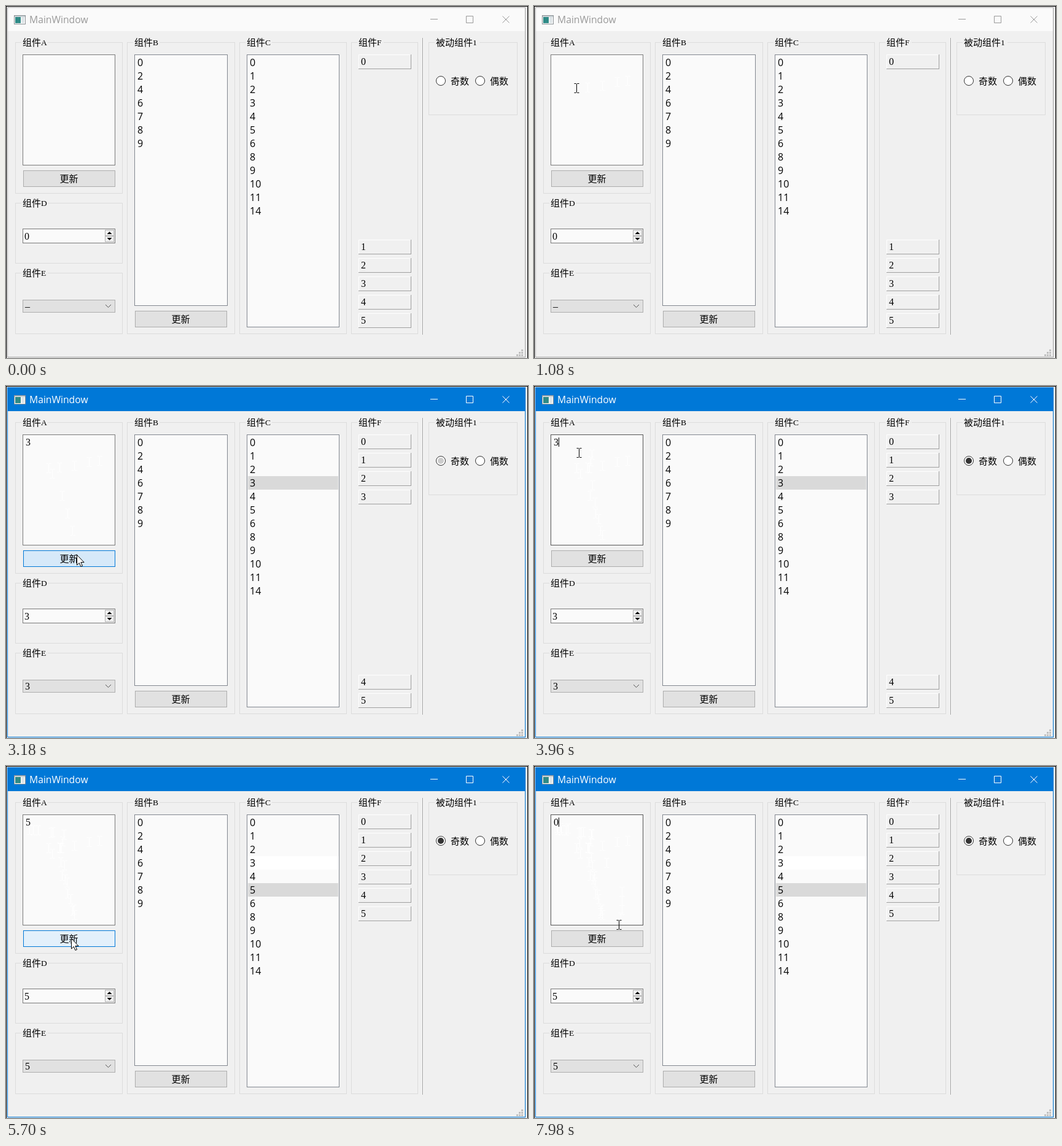
An HTML page for the animation above (8000 ms loop, 850 px wide and 574 px high).

```html
<!DOCTYPE html>
<html lang="zh-CN">
<head>
<meta charset="utf-8">
<title>MainWindow</title>
<style>
html, body { margin: 0; width: 100%; height: 100%; overflow: hidden; background: #f0f0f0; }
svg { display: block; width: 850px; height: 574px; }
text { white-space: pre; fill: #000; }
.cjk { font: 15px "Noto Sans CJK SC", "Noto Sans CJK", sans-serif; }
.lat { font: 13.5px "Liberation Serif", serif; }
.num { font: 16px "Liberation Serif", serif; }
.row { font: 16px "Open Sans", "Noto Sans", sans-serif; }
#title { font: 15.7px "Open Sans", "Noto Sans", sans-serif; }
rect { shape-rendering: crispEdges; }
</style>
</head>
<body>
<svg id="stage" viewBox="0 0 850 574" xmlns="http://www.w3.org/2000/svg"></svg>
<script>
const LOOP = 8000, STEP = 60;
const FACE = '#f0f0f0', PAPER = '#fafafa', BLUE = '#0078d7';
const ACTIVATE = 1140, FIRST = 3120, SECOND = 5520;

// ---- markup helpers ----
const fill = (x, y, w, h, c, id = '') =>
  `<rect ${id && `id="${id}"`} x="${x}" y="${y}" width="${w}" height="${h}" fill="${c}"/>`;
const box = (x, y, w, h, c, line, id = '') =>
  `<rect ${id && `id="${id}"`} x="${x + .5}" y="${y + .5}" width="${w - 1}" height="${h - 1}" fill="${c}" stroke="${line}"/>`;
const text = (x, y, cls, s, id = '') => `<text ${id && `id="${id}"`} class="${cls}" x="${x}" y="${y}">${s}</text>`;
const path = (d, attrs) => `<path d="${d}" ${attrs}/>`;

function group(x, y, w, h, name, mark) {
  const tw = name.length * 15 + 8;
  return box(x, y, w, h, 'none', '#dcdcdc') + fill(x + 10, y, tw + 5, 1, FACE) +
    text(x + 12, y + 6, 'cjk', `${name}<tspan class="lat" dy="-1">${mark}</tspan>`);
}

function button(x, y, id) {
  return box(x, y, 150, 27, '#e1e1e1', '#adadad', id) + text(x + 59.5, y + 19, 'cjk', '更新');
}

const rows = (x, list) => list.map((n, i) => text(x, 98 + 22 * i, 'row', n)).join('');

function radio(x, label) {
  return `<circle cx="${x}" cy="122" r="7.5" fill="#fff" stroke="#333"/>` + text(x + 16, 128, 'cjk', label);
}

function plate(n) {
  return `<g id="plate${n}">` + fill(574, 0, 86, 24, '#a0a0a0') + fill(574, 0, 85, 23, '#fff') +
    fill(575, 1, 84, 22, FACE) + text(578, 17, 'num', n) + '</g>';
}

function grip() {
  let s = '';
  for (let r = 0; r < 3; r++)
    for (let c = 2 - r; c < 3; c++) s += fill(831 + 4 * c, 560 + 4 * r, 3, 3, '#bfbfbf');
  return s;
}

const icon = box(13, 15, 19, 15, '#fff', '#8a9094') + fill(14, 16, 17, 2, '#c9d2d6') +
  fill(15, 18, 9, 10, '#2f8a86') + fill(25, 18, 5, 10, '#dfe5e8');

const stage = document.getElementById('stage');
stage.innerHTML =
  fill(0, 0, 850, 574, '#000') + fill(1, 1, 848, 573, '#e9e9e9') +
  box(2, 2, 844, 571, FACE, '#aaa', 'frame') + fill(3, 3, 842, 38, '#fafafa', 'bar') +
  icon + text(38, 28, '', 'MainWindow', 'title') +
  path('M691 21.5H703M749.5 16.5H760.5V27.5H749.5ZM808.5 16.5L819.5 27.5M819.5 16.5L808.5 27.5',
    'id="controls" fill="none"') +
  group(15, 59, 175, 247, '组件', 'A') + group(15, 321, 175, 99, '组件', 'D') +
  group(15, 435, 175, 100, '组件', 'E') + group(197, 59, 176, 476, '组件', 'B') +
  group(380, 59, 175, 476, '组件', 'C') + group(562, 59, 109, 476, '组件', 'F') +
  group(688, 59, 145, 119, '被动组件', '1') +
  fill(678, 52, 1, 484, '#a0a0a0') + fill(679, 52, 1, 484, '#fff') +
  box(27, 79, 151, 181, PAPER, '#7a7a7a', 'edit') + path('', 'id="trail" fill="none" stroke="#fff"') +
  fill(32, 84, 8, 16, BLUE, 'mark') + text(32, 97, 'num', '', 'typed') + fill(40, 84, 1, 15, '#000', 'caret') +
  button(28, 268, 'push') +
  box(27, 363, 151, 24, PAPER, '#7a7a7a') + text(30, 381, 'num', '', 'spin') +
  box(161, 365, 15, 10, FACE, '#b4b4b4') + box(161, 375, 15, 10, FACE, '#b4b4b4') +
  path('M164.5 372L168.5 368L172.5 372ZM164.5 378L168.5 382L172.5 378Z', '') +
  box(27, 479, 151, 21, '#e1e1e1', '#adadad') + text(31, 495, 'num', '', 'combo') +
  path('M162 487L166.5 491.5L171 487', 'fill="none" stroke="#555"') +
  box(209, 79, 152, 410, PAPER, '#828790') + rows(214, [0, 2, 4, 6, 7, 8, 9]) + button(210, 497) +
  box(392, 79, 151, 445, PAPER, '#828790') + fill(393, 147, 149, 22, '#fff', 'past') +
  fill(394, 0, 147, 22, '#d9d9d9', 'pick') + rows(397, [0, 1, 2, 3, 4, 5, 6, 8, 9, 10, 11, 14]) +
  [0, 1, 2, 3, 4, 5].map(plate).join('') +
  radio(708, '奇数') + radio(772, '偶数') + '<circle id="dot" cx="708" cy="122" r="5"/>' + grip() +
  path('M0 0V16.5L3.8 13L6.4 19L9 17.9L6.4 12H11.6Z', 'id="arrow" fill="#fff" stroke="#000"') +
  path('', 'id="beam" fill="none" stroke="#000"');

const el = {};
stage.querySelectorAll('[id]').forEach(e => el[e.id] = e);
const set = (id, attrs) => { for (const k in attrs) el[id].setAttribute(k, attrs[k]); };
const show = (id, on) => set(id, { visibility: on ? 'visible' : 'hidden' });

// ---- motion ----
// time, x, y of the pointer
const route = [
  [120, 802, 60], [360, 560, 88], [600, 225, 116], [720, 152, 122], [780, 135, 124], [840, 111, 130],
  [900, 87, 133], [1020, 87, 133], [1080, 69, 134], [1440, 69, 134], [1500, 75, 143], [2460, 75, 143],
  [2520, 91, 179], [2640, 108, 236], [2760, 115, 275], [3480, 115, 275], [3540, 111, 243],
  [3660, 99, 190], [3780, 90, 134], [3900, 94, 112], [4020, 52, 105], [4200, 52, 105],
  [4380, 10, 102], [4620, 12, 102], [4740, 76, 108], [4800, 94, 112], [4860, 88, 134],
  [4920, 89, 157], [4980, 96, 185], [5040, 110, 234], [5160, 106, 281], [5880, 106, 281],
  [5940, 108, 240], [6120, 93, 150], [6240, 55, 102], [6360, 18, 100], [6540, 55, 102],
  [6660, 55, 102], [6720, 80, 108], [6780, 93, 111], [7560, 93, 111], [7680, 143, 205],
  [7800, 143, 235], [7920, 138, 259]
];

// Linear blend of keyed rows, held at both ends
function blend(keys, t) {
  const i = keys.findIndex(k => k[0] > t);
  if (i < 0) return keys[keys.length - 1].slice(1);
  if (i === 0) return keys[0].slice(1);
  const a = keys[i - 1], b = keys[i], p = (t - a[0]) / (b[0] - a[0]);
  return a.slice(1).map((v, j) => v + (b[j + 1] - v) * p);
}
const rgb = c => `rgb(${c.map(Math.round)})`;

const IDLE = [225, 225, 225], HOVER = [229, 241, 251], PRESS = [204, 228, 247];
const glow = [
  [2700, ...IDLE], [2820, ...HOVER], [2940, ...HOVER], [3000, ...PRESS], [3120, ...PRESS],
  [3270, ...HOVER], [3480, ...HOVER], [3660, ...IDLE], [5040, ...IDLE], [5220, ...HOVER],
  [5340, ...HOVER], [5400, ...PRESS], [5520, ...PRESS], [5720, ...HOVER], [5880, ...HOVER], [6060, ...IDLE]
];

const within = (t, spans) => spans.some(([a, b]) => t >= a && t < b);
const point = t => blend(route, t).map(Math.round);
const isBeam = ([x, y]) => x < 178 && y >= 80 && y <= 260;
const beamPath = ([x, y]) =>
  `M${x - 3.5} ${y - 7.5}h3l1 1l1 -1h3M${x + .5} ${y - 7}v14M${x - 3.5} ${y + 7.5}h3l1 -1l1 1h3`;

function trail(t) {
  let d = '', last = '';
  for (let s = 120; s < t; s += STEP) {
    const p = point(s);
    if (String(p) === last) continue;
    last = String(p);
    if (isBeam(p) && p[0] > 30 && p[0] < 174 && p[1] < 250) d += beamPath(p);
  }
  return d;
}

function draw(t) {
  const active = t >= ACTIVATE;
  set('bar', { fill: active ? BLUE : '#fafafa' });
  set('frame', { stroke: active ? BLUE : '#aaa' });
  el.title.style.fill = active ? '#fff' : '#999';
  set('controls', { stroke: active ? '#fff' : '#999' });

  const focus = within(t, [[1200, 2940], [3960, 5340], [6240, LOOP]]);
  const selected = within(t, [[4380, 4620], [6360, 6720]]);
  set('edit', { stroke: focus ? '#555' : '#7a7a7a' });
  const typed = t < 2220 ? '' : t < 4620 ? '3' : t < 6720 ? '5' : '0';
  el.typed.textContent = typed;
  el.typed.style.fill = selected ? '#fff' : '#000';
  show('mark', selected);
  show('caret', within(t, [[1200, 1740], [2220, 2760], [3960, 4380], [4620, 5160], [6240, 6360], [6720, 7020], [7560, LOOP]]));
  set('caret', { x: typed ? 40 : 32 });
  set('trail', { d: trail(t) });

  const hot = within(t, [[2700, 3540], [5100, 5940]]);
  const down = within(t, [[2940, 3120], [5340, 5520]]);
  set('push', { fill: rgb(blend(glow, t)), stroke: down ? '#005499' : hot ? BLUE : '#adadad' });

  const value = t < FIRST ? 0 : t < SECOND ? 3 : 5;
  el.spin.textContent = value;
  el.combo.textContent = value || '–';
  show('past', value === 5);
  show('pick', value);
  set('pick', { y: 81 + 22 * value });
  for (let n = 0; n < 6; n++)
    set('plate' + n, { transform: `translate(0 ${n <= value ? 79 + 30 * n : 351 + 30 * n})` });
  show('dot', value);
  set('dot', { fill: rgb(blend([[FIRST, 255, 255, 255], [3360, 51, 51, 51]], t)) });

  const p = point(t), beam = isBeam(p);
  show('arrow', t >= 120 && !beam);
  show('beam', t >= 120 && beam);
  set('arrow', { transform: `translate(${p[0] + .5} ${p[1] + .5})` });
  set('beam', { d: beamPath(p) });
}

const start = performance.now();
let shown = -1;
function tick() {
  const t = Math.floor((performance.now() - start) % LOOP / STEP) * STEP;
  if (t !== shown) draw(shown = t);
  requestAnimationFrame(tick);
}
tick();
</script>
</body>
</html>
```
